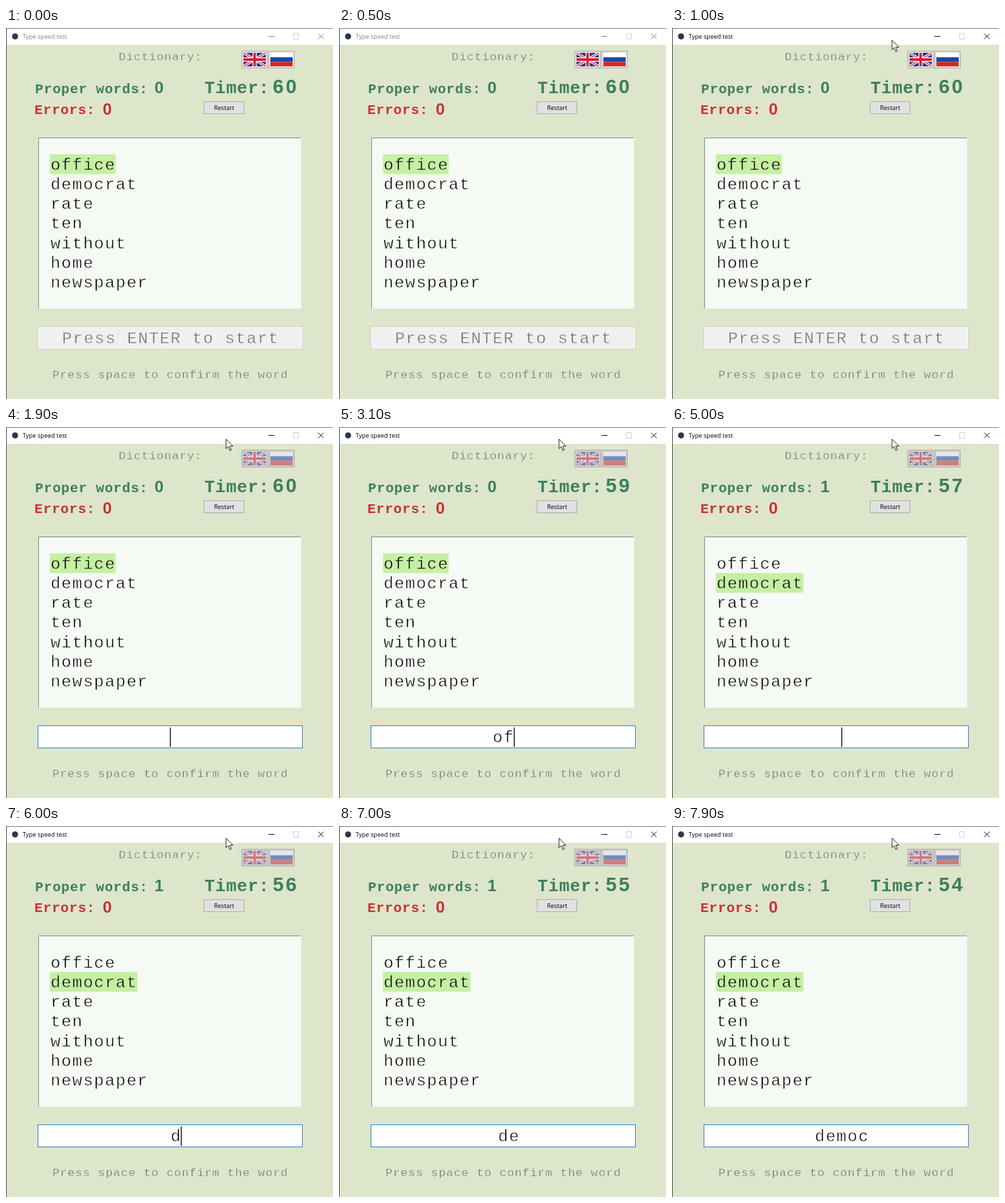
An HTML page for the animation above (8 s loop, 486 px wide and 552 px high).

```html
<!DOCTYPE html>
<html lang="en">
<head>
<meta charset="utf-8">
<title>Type speed test</title>
<style>
html, body { margin: 0; width: 100%; height: 100%; overflow: hidden; background: #dde5cb; }
svg { display: block; width: 486px; height: 552px; }
text { white-space: pre; }
.mono { font-family: "Liberation Mono", "Courier New", monospace; }
.digits { font-family: "Liberation Sans", Arial, sans-serif; font-weight: 700; }
.ui { font: 9.05px "Open Sans", "Noto Sans", sans-serif; }
</style>
</head>
<body>
<svg viewBox="0 0 486 552" xmlns="http://www.w3.org/2000/svg">
  <defs>
    <pattern id="stipple" width="2" height="2" patternUnits="userSpaceOnUse">
      <path d="M0 0h1v1h-1zM1 1h1v1h-1z" fill="#d0d0d0" shape-rendering="crispEdges"/>
    </pattern>
  </defs>
  <rect width="486" height="552" fill="#dde5cb"/>
  <rect width="486" height="25" fill="#fff"/>
  <path d="M.5 0V552" stroke="#4a4a48"/>
  <path d="M0 .5H486" stroke="#7c7c7c"/>
  <circle cx="13.5" cy="12.5" r="4.5" fill="#2c3944"/>
  <text id="title" class="ui" x="24.7" y="16">Type speed test</text>
  <g id="controls" fill="none">
    <path d="M390 12.5h9M464 8.5l8 8m0-8l-8 8"/>
    <rect x="427.5" y="8.5" width="7" height="8" stroke="#d0d0d0"/>
  </g>

  <g id="buttons" stroke="#adadad">
    <rect x="350.5" y="34.5" width="38" height="25"/>
    <rect x="390.5" y="34.5" width="38" height="25"/>
  </g>
  <svg x="353" y="37" width="33" height="20" viewBox="0 0 33 20">
    <rect width="33" height="20" fill="#22357d"/>
    <path d="M0 0L33 20M33 0L0 20" stroke="#fff" stroke-width="4"/>
    <path d="M0 0L33 20M33 0L0 20" stroke="#cf2338" stroke-width="1.4"/>
    <path d="M16.5 0V20M0 10H33" stroke="#fff" stroke-width="6.4"/>
    <path d="M16.5 0V20M0 10H33" stroke="#cf2338" stroke-width="3.8"/>
  </svg>
  <rect x="393" y="37" width="33" height="20" fill="#fff"/>
  <rect x="393" y="43.5" width="33" height="7" fill="#1d45a8"/>
  <rect x="393" y="50.5" width="33" height="6.5" fill="#d52b1e"/>
  <path id="disabled" d="M352 36h35v22h-35zM392 36h35v22h-35z" fill="url(#stipple)"/>

  <rect x="294.5" y="109.5" width="59" height="18" fill="#e1e1e1" stroke="#adadad"/>
  <text class="ui" x="309.2" y="122">Restart</text>

  <rect x="48.5" y="163.5" width="390" height="254" fill="#f5faf4" stroke="#eceeea"/>
  <path d="M48.5 417.5V163.5H438" fill="none" stroke="#858a83"/>
  <rect id="mark" x="65.3" height="29.3" fill="#c5f0a3"/>
  <rect id="entryBox" x="47.5" y="444.5" width="393" height="33"/>
  <rect id="entryRim" x="48.5" y="445.5" width="391" height="31" fill="none" stroke="#fff"/>
  <g id="labels"></g>
  <path id="caret" stroke="#000" stroke-width="1.3"/>
  <path id="pointer" d="M0 0v14.2l3.2-3 2.5 5.8 2.2-1-2.4-5.5h4.6z" fill="#fff" stroke="#111" stroke-width=".9"/>
</svg>
<script>
const LOOP = 8000, STEP = 100;
const SMALL = 11.32, MEDIUM = 12.92, LARGE = 16.15, HUGE = 19.4;
const GREEN = '#3a7f5e', RED = '#c83232', GREY = '#6f7568', PAGE = '#dde5cb';
const LIST = '#f5faf4', MARK = '#c5f0a3';
const WORDS = ['office', 'democrat', 'rate', 'ten', 'without', 'home', 'newspaper'];
const ROW = 29.25, CENTER = 244;
const START = 1800, CONFIRM = 5000;
const PROMPT = 'Press ENTER to start';
// [time, entry content]
const TYPING = [[0, PROMPT], [START, ''], [2900, 'o'], [3100, 'of'], [3300, 'off'],
  [4000, 'offi'], [4100, 'offic'], [4200, 'office'], [CONFIRM, ' '], [5900, ' d'],
  [6200, ' de'], [7400, ' dem'], [7600, ' demo'], [7900, ' democ']];
const TICKS = [2800, 3800, 4800, 5800, 6800, 7900];

const $ = id => document.getElementById(id);
function set(el, attrs) {
  for (const name in attrs) el.setAttribute(name, attrs[name]);
}

// Places text on a fixed pitch; size is the font size, advance the glyph width in em.
function pitched(x, y, content, pitch, size, advance, attrs) {
  const el = document.createElementNS('http://www.w3.org/2000/svg', 'text');
  const gap = pitch - size * advance;
  set(el, { x: x + gap / 2, y, 'font-size': size, 'letter-spacing': gap, ...attrs });
  el.textContent = content;
  $('labels').append(el);
  return el;
}

const bold = (x, y, content, pitch, fill) =>
  pitched(x, y, content, pitch, pitch * 1.58, .6, { class: 'mono', fill, 'font-weight': 700 });

const digits = (x, y, content, pitch, fill) =>
  pitched(x, y, content, pitch, pitch * 1.5, .556, { class: 'digits', fill });

// The backdrop-coloured outline makes the strokes finer.
const fine = (x, y, content, pitch, fill, backdrop) =>
  pitched(x, y, content, pitch, pitch * 1.52, .6,
    { class: 'mono', fill, stroke: backdrop, 'stroke-width': pitch / 28 });

fine(167, 48, 'Dictionary:', SMALL, GREY, PAGE);
fine(68.5, 521, 'Press space to confirm the word', SMALL, GREY, PAGE);
bold(43, 97, 'Proper words:', MEDIUM, GREEN);
bold(42, 128, 'Errors:', MEDIUM, RED);
bold(294.5, 97, 'Timer:', LARGE, GREEN);
digits(142.5, 129, '0', LARGE, RED);
const score = digits(219.5, 97, '0', LARGE, GREEN);
const timer = digits(394.8, 97, '60', HUGE, GREEN);
const rows = WORDS.map((word, i) => fine(65.5, 210.5 + i * ROW, word, LARGE, '#000', LIST));
const entry = fine(0, 469, '', LARGE, '#000', '#fff');

function drawPointer(t) {
  const p = Math.min(1, Math.max(0, (t - 500) / 500));
  const ease = 1 - (1 - p) ** 3;
  set($('pointer'), {
    visibility: p > 0 ? 'visible' : 'hidden',
    transform: `translate(${-12 + 339 * ease} ${170 - 152 * ease})`
  });
}

function draw(t) {
  const active = t >= 800, running = t >= START, done = t >= CONFIRM ? 1 : 0;
  set($('title'), { fill: active ? '#000' : '#858585' });
  set($('controls'), { stroke: active ? '#111' : '#858585' });
  set($('buttons'), { fill: running ? '#cecece' : '#e1e1e1' });
  set($('disabled'), { visibility: running ? 'visible' : 'hidden' });
  drawPointer(t);

  score.textContent = done;
  timer.textContent = 60 - TICKS.filter(tick => t >= tick).length;
  set($('mark'), { y: 188 + done * ROW, width: WORDS[done].length * LARGE + .8 });
  rows.forEach((row, i) => set(row, { stroke: i === done ? MARK : LIST }));

  const content = TYPING.findLast(([time]) => t >= time)[1];
  const half = content.length * LARGE / 2;
  entry.textContent = content;
  set(entry, {
    x: CENTER - half + LARGE * .04,
    fill: running ? '#000' : '#6c6c6c',
    stroke: running ? '#fff' : '#f0f0f0'
  });
  set($('entryBox'), {
    fill: running ? '#fff' : '#f0f0f0',
    stroke: running ? '#2f83bd' : '#cfd1c9'
  });
  set($('entryRim'), { visibility: running ? 'hidden' : 'visible' });
  const blinkOn = running && (t - 1785) % 915 < 600;
  set($('caret'), {
    d: `M${CENTER + half + .3} 447V476`,
    visibility: blinkOn ? 'visible' : 'hidden'
  });
}

function frame() {
  draw(Math.floor(performance.now() % LOOP / STEP) * STEP);
  requestAnimationFrame(frame);
}
frame();
</script>
</body>
</html>
```
